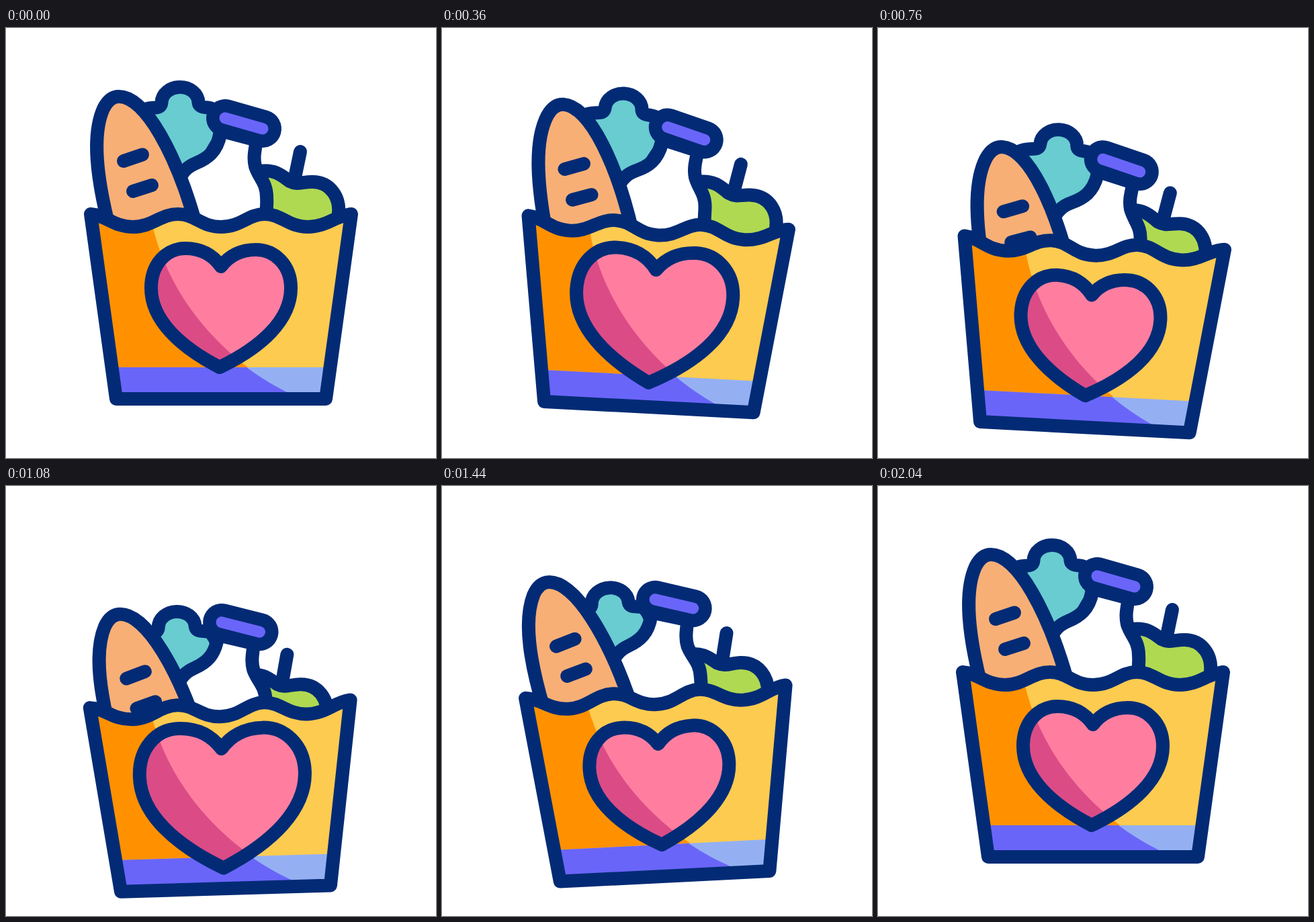
Animation of 640x640 px, one loop 2.08 s. Source, as an HTML page:

```html
<!DOCTYPE html>
<html lang="en">
<head>
<meta charset="utf-8">
<title>Grocery bag</title>
<style>
  html, body { margin: 0; width: 100%; height: 100%; overflow: hidden; background: #fff; }
  svg { display: block; width: 640px; height: 640px; }
  .line { fill: none; stroke: #032b75; stroke-width: 20; stroke-linecap: round; stroke-linejoin: round; }
  #heartLine { vector-effect: non-scaling-stroke; }
</style>
</head>
<body>
<svg viewBox="0 0 640 640">
  <defs>
    <path id="bagShape" d="M126 277C150 279 160 296 189 296S230 277 256 277S290 296 320 296S360 277 385 277S420 296 449 296S490 279 514 277L476 552H164Z"/>
    <path id="shade" d="M100 260H212L216 285C240 400 320 490 420 543L440 560H100Z"/>
    <clipPath id="bagClip"><use href="#bagShape"/></clipPath>
    <clipPath id="heartClip"><path class="heart"/></clipPath>
  </defs>
  <g id="bag">
    <g id="lettuce">
      <path class="line" style="fill:#68ccd1" d="M200 124C215 114 230 124 231.500 111C232 97 245 88 259 88C273 88 286 97 286.500 111C288 122 303 115 310 122C320 135 322 150 315 170L280 230H230Z"/>
    </g>
    <g id="apple">
      <path class="line" style="fill:#b0d952" d="M378 213C400 210 410 219 422 228C434 234 440 229 456 229C482 229 500 252 494 283C488 315 470 330 440 330H390Z"/>
      <path class="line" d="M438 184L430.500 220"/>
    </g>
    <g id="bottle">
      <path class="line" style="fill:#fff" d="M320 153L319 158C314 184 300 194 283 201C271 206 264 212 256 228V310H380C386 290 389 268 388 252C388 230 377 224 371 206C368 194 370 184 373 167Z"/>
      <path class="line" style="stroke-width:56" d="M326 134L382 150"/>
      <path class="line" style="stroke:#6a65f9;stroke-width:17" d="M326 134L382 150"/>
    </g>
    <g id="bread">
      <path class="line" style="fill:#f8af76" d="M152 290C136 225 127 160 145 120C152 106 160 102 168 102C208 102 254 190 282 290"/>
      <path class="line" d="M175 198L203 188.500M189 243L217 234"/>
    </g>
    <use href="#bagShape" fill="#fdcb50"/>
    <g clip-path="url(#bagClip)">
      <use href="#shade" fill="#ff9100"/>
      <path fill="#94b0f3" d="M100 505H540V560H100Z"/>
      <path fill="#6a65f9" d="M100 505H358C378 520 398 532 420 543L440 560H100Z"/>
    </g>
    <use href="#bagShape" class="line"/>
    <path class="heart" fill="#ff7ea0"/>
    <g clip-path="url(#heartClip)"><use href="#shade" fill="#db4c86"/></g>
    <path class="heart line" id="heartLine"/>
  </g>
</svg>
<script>
  const LOOP = 2080, STEP = 40;
  const heartPath = "M320 355C308 338 290 328 267 328C238 328 216 352 216 387C216 435 260 475 318 505C380 475 424 435 424 387C424 353 400 330 372 330C350 330 332 339 320 355Z";

  // [time, value] pairs, eased from one to the next
  const tracks = {
    drop:    [[0, 0], [1000, 47.8], [2000, 0]],
    tilt:    [[0, 0], [440, 3.2], [680, 3.2], [1270, -3], [1330, -3], [2040, 0]],
    beat:    [[0, 1], [250, 1.2], [500, 1], [760, 1], [1040, 1.19], [1330, 1]],
    bread:   [[140, 0], [900, 42.5], [1600, 0]],
    lettuce: [[420, 0], [1120, 50], [1860, 0]],
    bottle:  [[280, 0], [980, 22.5], [1700, 0]],
    apple:   [[400, 0], [1060, 22.5], [1820, 0]]
  };
  // sideways drift per pixel of sinking
  const drift = { bread: 0.18, lettuce: 0, bottle: 0, apple: -0.72 };

  // cubic-bezier(.45, 0, .55, 1)
  function ease(x) {
    let lo = 0, hi = 1, s = x;
    for (let i = 0; i < 24; i++) {
      s = (lo + hi) / 2;
      const r = 1 - s;
      if (1.35 * r * r * s + 1.65 * r * s * s + s * s * s < x) lo = s; else hi = s;
    }
    return s * s * (3 - 2 * s);
  }

  function valueAt(keys, t) {
    if (t <= keys[0][0]) return keys[0][1];
    for (let i = 1; i < keys.length; i++) {
      const [t0, a] = keys[i - 1], [t1, b] = keys[i];
      if (t <= t1) return a + (b - a) * ease((t - t0) / (t1 - t0));
    }
    return keys[keys.length - 1][1];
  }

  const byId = id => document.getElementById(id);
  const move = (el, value) => el.setAttribute("transform", value);
  const hearts = document.querySelectorAll(".heart");
  hearts.forEach(el => el.setAttribute("d", heartPath));

  function draw(t) {
    const at = name => valueAt(tracks[name], t);
    move(byId("bag"), `translate(0 ${at("drop")}) rotate(${at("tilt")} 320 320)`);
    for (const name in drift) {
      const y = at(name);
      move(byId(name), `translate(${y * drift[name]} ${y})`);
    }
    const scale = `translate(320 416) scale(${at("beat")}) translate(-320 -416)`;
    hearts.forEach(el => move(el, scale));
  }

  const start = performance.now();
  function tick() {
    const t = (performance.now() - start) % LOOP;
    draw(Math.floor(t / STEP) * STEP);
    requestAnimationFrame(tick);
  }
  draw(0);
  requestAnimationFrame(tick);
</script>
</body>
</html>
```
